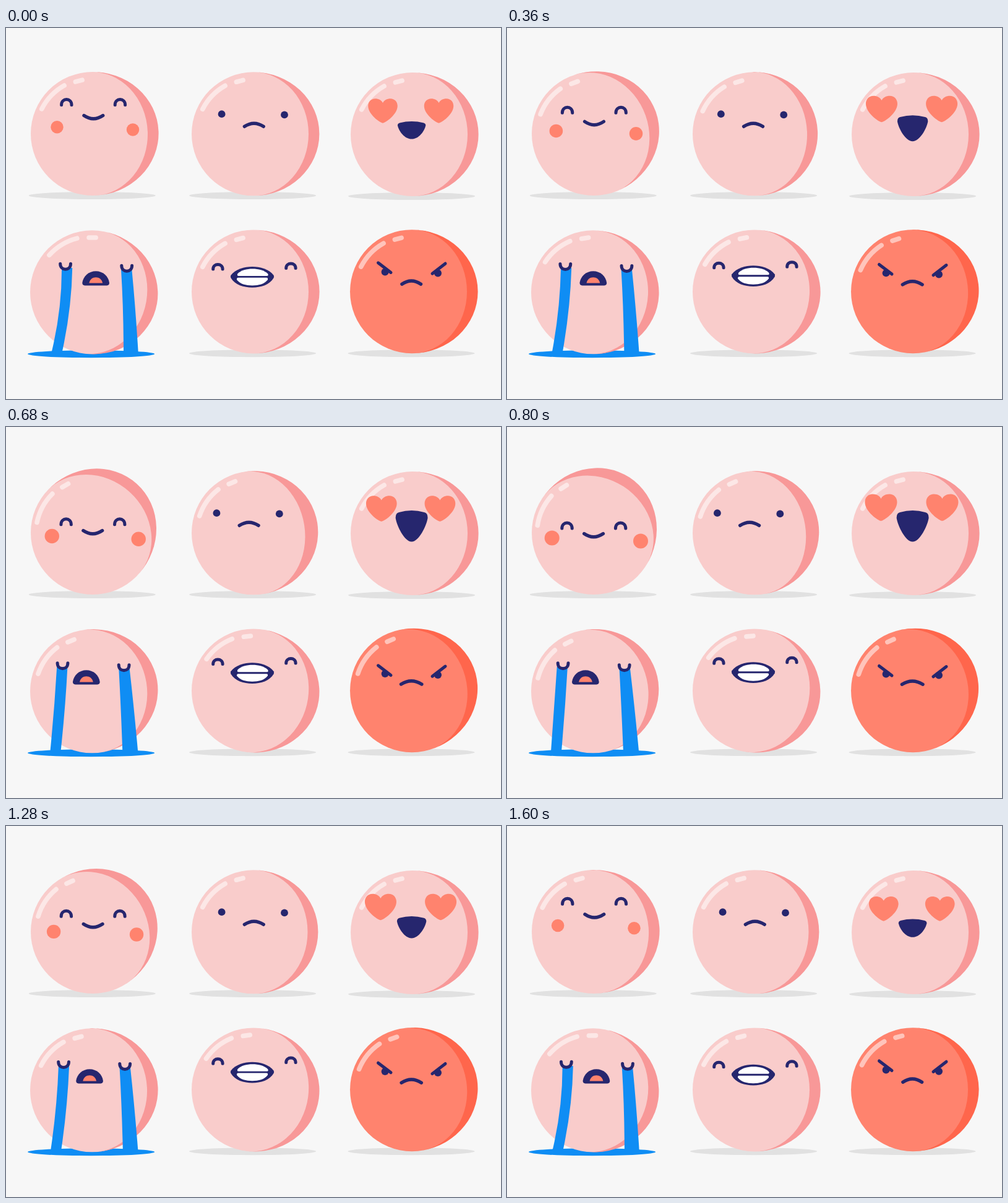
An HTML page for the animation above (1640 ms loop, 800x600 px).

```html
<!DOCTYPE html>
<html lang="en">
<head>
<meta charset="utf-8">
<title>Mood balls</title>
<style>
  html, body { margin: 0; width: 100%; height: 100%; overflow: hidden; background: #f7f7f7; }
  svg { display: block; width: 100%; height: 100%; }
  .line { fill: none; stroke: #26266e; stroke-width: 5.4; stroke-linecap: round; }
  .thin { stroke-width: 5; }
  .navy { fill: #26266e; }
  .coral { fill: #ff836e; }
  .blue { fill: #0f8df4; }
  .shine { fill: none; stroke: #fff; stroke-opacity: .53; stroke-width: 7.6; stroke-linecap: round; }
</style>
</head>
<body>
<svg id="stage" viewBox="0 0 800 600"></svg>
<script>
const LOOP = 1640, STEP = 40;
const stage = document.getElementById('stage');

function add(tag, attrs, parent = stage) {
  const el = document.createElementNS('http://www.w3.org/2000/svg', tag);
  set(el, attrs);
  parent.append(el);
  return el;
}
function set(el, attrs) {
  for (const k in attrs) el.setAttribute(k, attrs[k]);
}
const path = (cls, d, parent) => add('path', { class: cls, d }, parent);
const dot = (cls, cx, cy, r, parent) => add('circle', { class: cls, cx, cy, r }, parent);
const group = () => add('g', {});
const shift = (el, x, y) => set(el, { transform: `translate(${x} ${y})` });
const mix = (a, b, k) => a + (b - a) * k;

// Periodic smooth curve through a few [time, value] points.
function curve(pts) {
  const n = pts.length;
  const at = i => {
    const turn = Math.floor(i / n), p = pts[i - turn * n];
    return [p[0] + turn * LOOP, p[1]];
  };
  const slope = i => {
    const a = at(i - 1), b = at(i + 1);
    return (b[1] - a[1]) / (b[0] - a[0]);
  };
  return t => {
    let i = 0;
    while (i < n - 1 && t >= pts[i + 1][0]) i++;
    const [t0, a] = at(i), [t1, b] = at(i + 1), d = t1 - t0, u = (t - t0) / d;
    const u2 = u * u, u3 = u2 * u;
    return a * (2 * u3 - 3 * u2 + 1) + b * (3 * u2 - 2 * u3)
      + d * (slope(i) * (u3 - 2 * u2 + u) + slope(i + 1) * (u3 - u2));
  };
}

// Eased moves between poses, resting after the last one.
const shakeTimes = [0, 240, 485, 745, 1000, 1250];
function shake(t, vals) {
  let i = 0;
  while (i < 5 && t >= shakeTimes[i + 1]) i++;
  if (i === 5) return vals[5];
  const u = (t - shakeTimes[i]) / (shakeTimes[i + 1] - shakeTimes[i]);
  return mix(vals[i], vals[i + 1], (1 - Math.cos(Math.PI * u)) / 2);
}

const nod = curve([[0, 0], [200, .12], [520, .55], [800, 1], [1000, .89], [1280, .55], [1600, .04]]);
const gape = curve([[0, 0], [200, .31], [520, .87], [800, 1], [1000, .7], [1280, .31], [1600, .03]]);
const lift = curve([[0, 0], [200, .05], [520, .5], [800, .88], [1000, 1], [1280, .66], [1600, .02]]);
const frown = curve([[0, 0], [200, .1], [520, .7], [800, 1], [1000, .86], [1280, .52], [1600, .03]]);
const pulse = t => (1 - Math.cos(2 * Math.PI * 3 * t / LOOP)) / 2;

const crescent = (out, inn) => `M0 -100A${out} 100 0 0 1 0 100A${inn} 100 0 0 0 0 -100Z`;

function polar(r, deg) {
  const a = deg * Math.PI / 180;
  return `${(r * Math.sin(a)).toFixed(2)} ${(-r * Math.cos(a)).toFixed(2)}`;
}

function ball(x, y, floor, light = '#f9cccb', dark = '#f89898', ground = '#e1e1e1') {
  add('ellipse', { cx: floor[0], cy: floor[1], rx: 102.5, ry: 6, fill: ground });
  const g = add('g', { transform: `translate(${x} ${y})` });
  add('circle', { r: 100, fill: light }, g);
  const shade = add('path', { d: crescent(106.6, 89), fill: dark }, g);
  const shine = add('g', {}, g);
  path('shine', `M${polar(91.5, -64)}A91.5 91.5 0 0 1 ${polar(90.5, -30.5)}`, shine);
  path('shine', `M${polar(88.5, -18.2)}L${polar(88.5, -11)}`, shine);
  return {
    shade,
    turn(a, b) {
      set(shade, { transform: `rotate(${a})` });
      set(shine, { transform: `rotate(${b})` });
    }
  };
}

// Small arch; a negative height makes a cup.
const arch = (x, y, w, h, parent) =>
  path('line thin', `M${x} ${y}c0 ${-h} ${w} ${-h} ${w} 0`, parent);

function happy() {
  const b = ball(140, 171, [139.3, 271]);
  const cheeks = [dot('coral', 0, 0, 10), dot('coral', 0, 0, 10)];
  const eyes = group(), mouth = group();
  arch(89.6, 124.6, 16.4, 12, eyes);
  arch(176.2, 124.6, 16.4, 12, eyes);
  path('line', 'M126 141.5Q141.3 152 156.7 141.5', mouth);
  return t => {
    const p = nod(t), r = mix(10.2, 12, p);
    b.turn(-2 - 55 * p, -18.5 * p);
    shift(eyes, -.8 * p, 39.5 * p);
    shift(mouth, -1.3 * p, 31 * p);
    set(cheeks[0], { cx: 82.5 - 9.8 * p, cy: 160.3 + 19.3 * p, r });
    set(cheeks[1], { cx: 205 + 11 * p, cy: 164.5 + 20 * p, r });
  };
}

function sad() {
  const b = ball(400, 171.3, [398.6, 271]);
  const face = group();
  dot('navy', 348.6, 139.2, 5.9, face);
  dot('navy', 450, 140.4, 5.9, face);
  path('line', 'M385.4 159.3Q400.8 149 416.2 159.3', face);
  return t => {
    b.turn(shake(t, [0, -13, 9, -12, 10, 0]), shake(t, [0, -12.5, 8.8, -11.5, 9.8, 0]));
    set(b.shade, { d: crescent(
      shake(t, [106.4, 100, 104.4, 104.4, 104.4, 104.4]),
      shake(t, [89, 78.5, 92, 81.5, 92.5, 87.5])) });
    shift(face, shake(t, [0, -11, 6, -10.6, 6.6, 0]), 0);
  };
}

function love() {
  ball(657, 172, [655.6, 272]);
  const shape = 'M0 20C-4 20 -24 6 -24 -8C-24 -15 -19 -20 -12.5 -20C-7 -20 -2 -17.5 0 -13'
    + 'C2 -17.5 7 -20 12.5 -20C19 -20 24 -15 24 -8C24 6 4 20 0 20Z';
  const hearts = [path('coral', shape), path('coral', shape)];
  const mouth = path('navy', '');
  return t => {
    const k = pulse(t), m = gape(t), size = mix(.99, 1.085, k);
    hearts.forEach((h, i) => {
      const x = i ? 699.5 + 4 * k : 609 - 4.6 * k;
      set(h, { transform: `translate(${x} ${134 - 4 * k}) scale(${size})` });
    });
    const w = mix(22.7, 26, m), edge = mix(157.5, 147, m), top = mix(153.4, 138, m);
    const inner = mix(19.5, 20.5, m), crown = mix(148.6, 132, m), low = mix(179.6, 185.6, m);
    const drop = mix(167, 160, m), x = 655.6;
    set(mouth, { d: `M${x - w} ${edge}Q${x - w} ${top + 1} ${x - inner} ${top}`
      + `Q${x} ${crown} ${x + inner} ${top}Q${x + w} ${top + 1} ${x + w} ${edge}`
      + `C${x + w - 2} ${drop} ${x + 11.5} ${low} ${x} ${low}`
      + `C${x - 11.5} ${low} ${x - w + 2} ${drop} ${x - w} ${edge}Z` });
  };
}

function crying() {
  const b = ball(139, 427.3, [137.6, 527.2], undefined, undefined, '#0f8df4');
  const tears = [path('blue', ''), path('blue', '')];
  const eyes = group(), mouth = group();
  arch(87.7, 381.3, 16.8, -12, eyes);
  arch(186.8, 384.3, 16.8, -12, eyes);
  path('navy', 'M123.3 412C125 401 134 393.2 145.2 393.2S165.4 401 167 412'
    + 'Q167 416.4 163 416.4H127.4Q123.3 416.4 123.3 412Z', mouth);
  path('coral', 'M134.3 412.6C135.5 406.5 140 403.3 145.2 403.3S155 406.5 156.1 412.6Z', mouth);
  return t => {
    const p = nod(t), a = 90 - 9.3 * p, c = 186 - 4.4 * p;
    b.turn(10 - 23 * p, 15 - 27.5 * p);
    shift(eyes, -5.5 * p, .4 * p);
    shift(mouth, -18.3 * p, 0);
    set(tears[0], { d: `M${a} 388Q${mix(90.5, 76, p)} 455 ${73.5 - 2.5 * p} 525`
      + `H${90.5 - 2.5 * p}Q${mix(106, 94, p)} 455 ${a + 17.2} 388Z` });
    set(tears[1], { d: `M${c} 391Q${mix(190, 185, p)} 455 ${190 - 2 * p} 526`
      + `H${213.8 - .6 * p}Q${mix(209.5, 206.5, p)} 455 ${c + 17.4} 391Z` });
  };
}

function grin() {
  const b = ball(400, 426.4, [398.6, 526.2]);
  const eyes = group(), mouth = group();
  arch(334.7, 390, 15.4, 10, eyes);
  arch(452.7, 388.4, 15.4, 10, eyes);
  path('navy', 'M363.3 404Q362.5 402 363.3 400C371 390 385 386 398 386S425 390 432.7 400'
    + 'Q433.5 402 432.7 404C426 415.5 412 419.7 398 419.7S370 415.5 363.3 404Z', mouth);
  const teeth = ['M376 401Q372.6 400.6 374.5 397.2C380 391.5 389 389.4 398.5 389.4'
    + 'S417 391.5 423 397.2Q425 400.6 421.5 401Z',
    'M375.5 403.8H421Q424 404.2 422.8 407.2C418 414 408 416.4 398 416.4S378 414 373.2 407.2'
    + 'Q372.2 404.2 375.5 403.8Z'];
  teeth.forEach(d => add('path', { d, fill: '#fff' }, mouth));
  return t => {
    const q = lift(t);
    b.turn(11.5 * q, 11 * q);
    shift(eyes, 0, -8.8 * q);
    shift(mouth, 0, -6.4 * q);
  };
}

function angry() {
  const b = ball(656, 426.2, [655, 526.2], '#ff836e', '#ff664c');
  const eyes = group(), brows = group(), mouth = path('line', '');
  dot('navy', 612.6, 394.4, 6, eyes);
  dot('navy', 698, 396.5, 6, eyes);
  path('line thin', 'M601.5 379.8L622 395.4', brows);
  path('line thin', 'M710 381L689 397.2', brows);
  return t => {
    const r = frown(t), y = 414.2 + 2 * r, w = 15.3 + 1.5 * r;
    b.turn(-16.5 * r, -9.5 * r);
    shift(eyes, 0, 5 * r);
    shift(brows, 0, 6.6 * r);
    set(mouth, { d: `M${655.2 - w} ${y}Q655.2 ${y - 10.6} ${655.2 + w} ${y}` });
  };
}

const faces = [happy(), sad(), love(), crying(), grin(), angry()];

function draw(ms) {
  const t = Math.floor((ms % LOOP) / STEP) * STEP;
  faces.forEach(f => f(t));
}

const start = performance.now();
function tick() {
  draw(performance.now() - start);
  requestAnimationFrame(tick);
}
tick();
</script>
</body>
</html>
```
